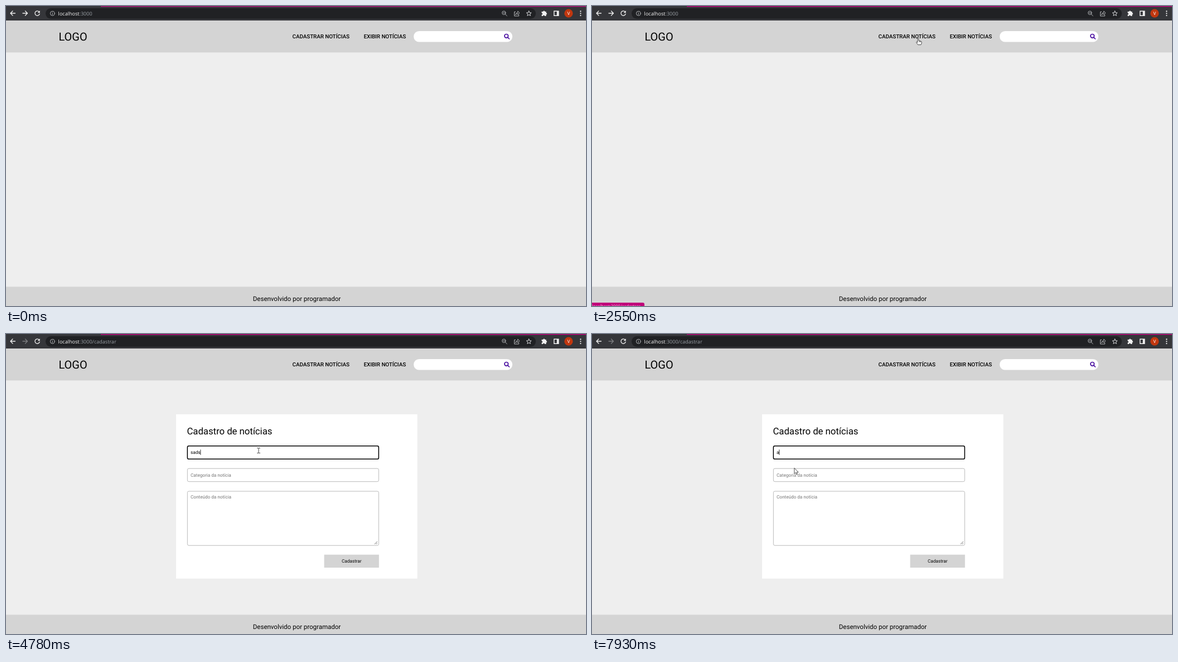
These frames come from a looping animation (1040 px wide and 538 px high, 7990 ms). An HTML page:

```html
<!DOCTYPE html>
<html lang="pt">
<head>
<meta charset="utf-8">
<title>Cadastro de notícias</title>
<style>
  html, body { margin: 0; width: 100%; height: 100%; overflow: hidden; background: #eee; }
  svg { display: block; width: 1040px; height: 538px; }
  text { font-family: Roboto, sans-serif; text-rendering: geometricPrecision; white-space: pre; }
  .ui { font-family: "Open Sans", "Noto Sans", sans-serif; }
  .nav { font-size: 9.8px; font-weight: 500; }
  .field { font-size: 8.17px; }
  .hint { fill: #757575; }
  .line { fill: none; stroke-linecap: round; stroke-linejoin: round; }
</style>
</head>
<body>
<svg viewBox="0 0 1040 538" xmlns="http://www.w3.org/2000/svg">
  <rect width="1040" height="538" fill="#eee"/>

  <!-- browser bar -->
  <rect width="1040" height="26" fill="#35363a"/>
  <rect id="strip" x="170" width="870" height="1.4"/>
  <rect x="71" y="4" width="879" height="19" rx="9.5" fill="#202124"/>
  <g class="line" stroke="#f1f1f1" stroke-width="1.3">
    <path d="M16.5 13H8M12 9L8 13L12 17"/>
    <path id="forward" d="M30 13H38.5M34.500 9L38.500 13L34.500 17"/>
    <path d="M59.300 10.200A4.200 4.200 0 1 0 60.200 14.200"/>
  </g>
  <path d="M60.700 8.300V12.300H56.700Z" fill="#f1f1f1"/>
  <g class="line" stroke="#b4b6b9" stroke-width="1">
    <circle cx="83.300" cy="13.300" r="3.900"/>
    <path d="M83.300 13V15.300M83.300 11.300V11.400"/>
    <circle cx="892.800" cy="12.300" r="3.200"/>
    <path d="M895.200 14.700L898.300 17.700M891.300 12.300H894.300"/>
    <path d="M913.500 10.500H911.500V18H919.500V16"/>
    <path d="M913.800 15.500C914.300 12.800 915.800 11.800 917.700 11.600V9.300L921 12.500L917.700 15.500V13.600C916 13.600 914.800 14.100 913.800 15.500Z"/>
    <path id="star" stroke="#dcdde0"/>
  </g>
  <path fill="#f1f1f1" d="M961 10H963.200A1.500 1.500 0 0 1 966.200 10H968.500V12.300A1.500 1.500 0 0 1 968.500 15.300V18H965.900A1.500 1.500 0 0 0 962.900 18H960.500V15.400A1.500 1.500 0 0 0 960.500 12.400V10Z"/>
  <path fill="#f1f1f1" fill-rule="evenodd" d="M982 8.500H991.500V18H982ZM983.400 9.900V16.600H987.700V9.900Z"/>
  <circle cx="1008.800" cy="13.200" r="7.600" fill="#c1370f"/>
  <text x="1008.800" y="16" font-size="8" text-anchor="middle" fill="#fff">V</text>
  <g fill="#f1f1f1">
    <circle cx="1030.300" cy="9.500" r="1.150"/><circle cx="1030.300" cy="13.300" r="1.150"/><circle cx="1030.300" cy="17.100" r="1.150"/>
  </g>
  <text class="ui" x="93.600" y="16.800" font-size="9.050" fill="#9aa0a6"><tspan fill="#f4f4f4">localhost</tspan>:3000<tspan id="path"></tspan></text>

  <!-- page header and footer -->
  <rect y="26" width="1040" height="57.300" fill="#d4d4d4"/>
  <rect y="503.500" width="1040" height="35" fill="#d4d4d4"/>
  <text x="94.400" y="62" font-size="20">LOGO</text>
  <text class="nav" x="513.500" y="58">CADASTRAR NOTÍCIAS</text>
  <text class="nav" x="641.400" y="58">EXIBIR NOTÍCIAS</text>
  <rect x="731" y="45" width="177" height="19.600" rx="9.800" fill="#fff"/>
  <g class="line" stroke="#4a0fa0" stroke-width="1.700">
    <circle cx="897.200" cy="53.800" r="3.300"/><path d="M899.800 56.400L902.400 59"/>
  </g>
  <text x="521.500" y="529.300" font-size="11.500" text-anchor="middle">Desenvolvido por programador</text>

  <!-- form -->
  <g id="form">
    <rect x="305" y="144" width="432.500" height="294.600" fill="#fff"/>
    <text x="324.500" y="179.600" font-size="16.700">Cadastro de notícias</text>
    <g fill="#fff">
      <rect id="titleBox" x="325.300" y="200.800" width="343" height="23.500" rx="2.600"/>
      <rect id="topicBox" x="325.300" y="241.200" width="343" height="23.500" rx="2.600"/>
      <rect x="325.300" y="282" width="343" height="97.200" rx="2.600" stroke="#b9b9b9"/>
    </g>
    <path d="M660.800 377L665.800 372M663.600 377L665.800 374.800" stroke="#555" stroke-width=".8"/>
    <rect id="select" x="331" y="207" width="26.700" height="10" fill="#3390ff"/>
    <text id="title" class="field" x="331" y="215"></text>
    <path id="squiggle" class="line" stroke="#e53935" stroke-width=".7"/>
    <text class="field hint" x="331" y="255.900">Categoria da notícia</text>
    <text class="field hint" x="331" y="295.200">Conteúdo da notícia</text>
    <rect id="caret" width=".8" height="9.600"/>
    <rect x="570.500" y="395.700" width="98.300" height="23.300" fill="#d4d4d4"/>
    <text class="field" x="619.700" y="410.300" text-anchor="middle">Cadastrar</text>
  </g>
  <g id="tip">
    <rect x="424.300" y="256.500" width="89.300" height="16.300" fill="#2b2b2b" stroke="#4a4a4a" stroke-width=".8"/>
    <text class="ui" x="428.800" y="267.700" font-size="7.700" fill="#f4f4f4">Preencha este campo.</text>
  </g>

  <!-- link status -->
  <g id="status">
    <path id="bubble" fill="#c0007a"/>
    <text id="link" class="ui" x="0" y="541" font-size="7.550" fill="#f3c9e2"></text>
  </g>

  <circle id="press" r="8.500" fill="#ff0" fill-opacity=".47"/>
  <g id="cursor">
    <path id="arrow" d="M0 0V10.300L2.400 8.200L4 11.700L5.600 11L4.100 7.600H7.300Z" fill="#fff" stroke="#222" stroke-width=".8" stroke-linejoin="round"/>
    <path id="hand" d="M-1 1Q0 -.6 1 1V4.500L5 5.300Q6.200 5.700 6.200 7V9L5 11.700H-.4L-3.200 7.800Q-3.500 6.300 -2.200 6.600L-1 7.700Z M2.300 5V7M4.200 5.300V7.200" fill="#fff" stroke="#222" stroke-width=".8" stroke-linejoin="round"/>
    <path id="beam" class="line" d="M-1.500 -3.500H.4L1 -3L1.600 -3.500H3.500M1 -3V5M-1.500 5.500H.4L1 5L1.600 5.500H3.500" stroke="#333" stroke-width=".9"/>
  </g>
</svg>
<script>
const LOOP = 7990;
const $ = id => document.getElementById(id);
const set = (id, attrs) => { for (const k in attrs) $(id).setAttribute(k, attrs[k]); };
const show = (id, on) => set(id, { visibility: on ? 'visible' : 'hidden' });
const within = (v, a, b) => v >= a && v < b;

// pointer moves: first change, last change, steps, end point
const START = [997, 510];
const MOVES = [
  [440, 1140, 11, 684.8, 57.8],
  [1670, 1950, 5, 584.8, 57.8],
  [2940, 3420, 8, 449.5, 197.5],
  [3910, 3980, 2, 452, 208],
  [4920, 5310, 6, 417.5, 246],
  [6440, 6770, 4, 335, 229],
  [6970, 7390, 5, 371, 223],
  [7590, 7660, 2, 365.5, 219.5],
  [7860, 7930, 2, 362.8, 240.3]
];
const PRESSES = [[2350, 2550], [3560, 3760], [4180, 4360], [6170, 6440], [7120, 7320]];
const TYPED = [[4520, 'sad'], [4720, 'sads'], [4990, 'sadsa'], [5200, 'sadsad'], [7590, 'a']];
const CARET_RESETS = [4180, 4520, 4720, 4990, 5200, 6170, 7120, 7590];

const lastBefore = (list, t) => list.filter(v => t >= v).pop();
const ease = p => p * p * (3 - 2 * p);

function pointer(t) {
  let [x, y] = START;
  MOVES.forEach(([a, b, n, ex, ey], i) => {
    if (t < a) return;
    const step = Math.min(n - 1, Math.floor((t - a) / (b - a) * (n - 1) + 1e-6));
    const p = ease(i ? (step + 1) / n : step / (n - 1));
    x += (ex - x) * p;
    y += (ey - y) * p;
  });
  return [x, y];
}

function shape(x, y, form) {
  if (within(y, 48, 61) && (within(x, 514, 617) || within(x, 642, 718))) return 'hand';
  const inField = within(y, 200, 225) || within(y, 241, 265);
  return form && inField && within(x, 325, 669) ? 'beam' : 'arrow';
}

function border(id, focus) {
  set(id, { stroke: focus ? '#000' : '#b9b9b9', 'stroke-width': focus ? 1.5 : 1 });
}

function drawStatus(t) {
  const long = t >= 1880;
  const w = long ? 94 : 58;
  set('bubble', { d: `M0 532H${w - 3}Q${w} 532 ${w} 535V538H0Z` });
  $('link').textContent = 'localhost:3000' + (long ? '/cadastrar' : '');
  set('status', { opacity: t < 1410 ? 0.5 : 1 });
  show('status', within(t, 1340, 3150));
}

function drawForm(t) {
  const onTitle = within(t, 4180, 6170) || t >= 7120;
  const onTopic = within(t, 6170, 7120);
  border('titleBox', onTitle);
  border('topicBox', onTopic);

  const entry = TYPED.filter(e => t >= e[0]).pop();
  const word = entry ? entry[1] : '';
  const selected = within(t, 7390, 7590);
  $('title').textContent = word || 'Título da notícia';
  set('title', { fill: selected ? '#fff' : word ? '#000' : '#757575' });
  show('select', selected);
  show('squiggle', within(t, 5980, 7590));

  const reset = lastBefore(CARET_RESETS, t);
  const lit = Math.floor((t - reset) / 505) % 2 === 0;
  const end = word && onTitle ? $('title').getComputedTextLength() : 0;
  set('caret', { x: 331 + end, y: onTopic ? 248 : 207.3 });
  show('caret', (onTitle || onTopic) && lit && !selected);
}

function draw(t) {
  const form = t >= 2620;
  set('strip', { fill: t < 2350 ? '#b3137a' : '#c0007a' });
  set('forward', { stroke: form ? '#7c7d80' : '#f1f1f1' });
  $('path').textContent = form ? '/cadastrar' : '';
  set('form', { display: form ? 'inline' : 'none' });
  if (form) drawForm(t);
  show('tip', within(t, 5710, 6170));
  drawStatus(t);

  const [x, y] = pointer(t);
  const kind = shape(x, y, form);
  for (const k of ['arrow', 'hand', 'beam']) show(k, t >= 440 && k === kind);
  set('cursor', { transform: `translate(${x} ${y})` });
  set('press', { cx: x, cy: y });
  show('press', PRESSES.some(([a, b]) => within(t, a, b)));
}

const starPoint = (_, i) => {
  const r = i % 2 ? 2.1 : 4.7, a = i * Math.PI / 5;
  return `${(937.6 + r * Math.sin(a)).toFixed(2)} ${(13.6 - r * Math.cos(a)).toFixed(2)}`;
};
set('star', { d: 'M' + Array.from({ length: 10 }, starPoint).join('L') + 'Z' });
set('squiggle', { d: 'M' + Array.from({ length: 18 }, (_, i) => `${331 + i * 1.55} ${i % 2 ? 215.5 : 216.6}`).join('L') });

const begin = performance.now();
function tick() {
  draw((performance.now() - begin) % LOOP);
  requestAnimationFrame(tick);
}
tick();
</script>
</body>
</html>
```
